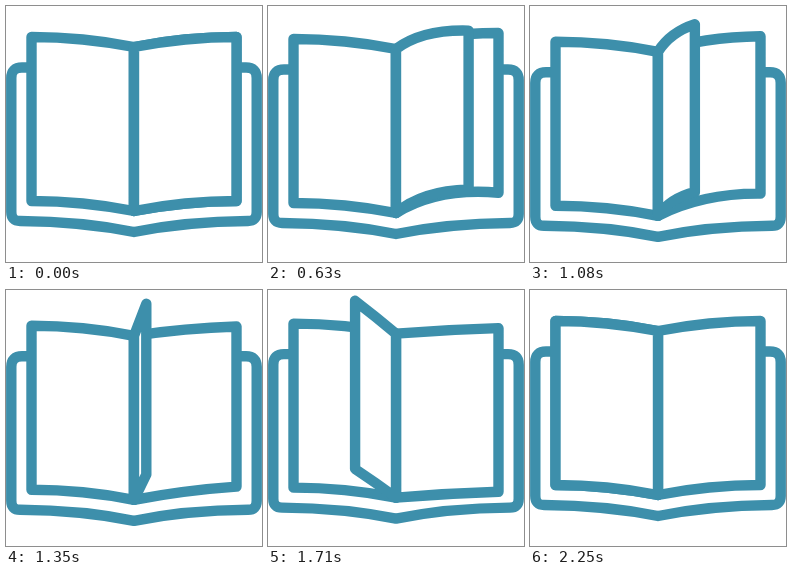
Animation, 256 px wide and 256 px high, one loop 2520 ms. Source, as an HTML page:

```html
<!DOCTYPE html>
<html lang="en">
<head>
<meta charset="utf-8">
<title>Book turning a page</title>
<style>
  html, body { margin: 0; width: 100%; height: 100%; overflow: hidden; background: #fff; }
  svg { display: block; width: 100vw; height: 100vh; }
  path { fill: #fff; stroke: #3d8fab; stroke-width: 10.4; stroke-linejoin: round; }
</style>
</head>
<body>
<svg viewBox="0 0 256 256">
  <path id="cover" d="M25 61.500H16Q5.300 61.500 5.300 72V206Q5.300 215 14 215Q76 215.500 128 226Q180 215.500 242 215Q250.700 215 250.700 206V72Q250.700 61.500 240 61.500H231"/>
  <path id="left"/>
  <path id="right"/>
  <path id="turning"/>
</svg>
<script>
const LOOP = 2520, STEP = 90, START = 180, END = 2250, BOB = 5;
const SPINE = { x: 128, top: 41, bottom: 205 };
const PAGE = { width: 102.5, top: 31, bottom: 195, bow: 5 };

// [time, reach]: the loose edge slows while the page stands upright
const TURN = [[START, 1], [810, 0.55], [1350, 0.12], [1890, -0.655], [END, -1]];

const byId = id => document.getElementById(id);

// Smooth curve through the points, at rest at both ends
function through(points, t) {
  const last = points.length - 1;
  const i = Math.max(0, points.findLastIndex((point, n) => n < last && point[0] <= t));
  const slope = n => n === 0 || n === last ? 0 :
    (points[n + 1][1] - points[n - 1][1]) / (points[n + 1][0] - points[n - 1][0]);
  const [t0, a] = points[i], [t1, b] = points[i + 1];
  const span = t1 - t0, u = (t - t0) / span, v = 1 - u;
  return a * v * v * (1 + 2 * u) + b * u * u * (1 + 2 * v) +
    span * u * v * (slope(i) * v - slope(i + 1) * u);
}

// reach: edge position from 1 (right) to -1 (left); rises lift the edge,
// bows arch the top and bottom lines, pull moves the arch to the spine
function drawPage(id, bob, { reach, riseTop = 0, riseBottom = 0,
                             bowTop = PAGE.bow, bowBottom = bowTop, pull = 0 }) {
  const x = SPINE.x + PAGE.width * reach;
  const top = PAGE.top - riseTop, bottom = PAGE.bottom - riseBottom;
  const bendX = (SPINE.x + x) / 2 - pull;
  const bendTop = (SPINE.top + top) / 2 - bowTop;
  const bendBottom = (SPINE.bottom + bottom) / 2 - bowBottom;
  const path = byId(id);
  path.setAttribute('transform', `translate(0 ${bob})`);
  path.setAttribute('d',
    `M${SPINE.x} ${SPINE.top}Q${bendX} ${bendTop} ${x} ${top}V${bottom}` +
    `Q${bendX} ${bendBottom} ${SPINE.x} ${SPINE.bottom}Z`);
}

function render(time) {
  const stepped = Math.floor((time % LOOP) / STEP) * STEP;
  const t = Math.min(END, Math.max(START, stepped));
  const phase = Math.PI * (t - START) / (END - START);
  const swell = Math.sin(phase) ** 2;
  const sway = Math.sin(2 * phase);
  const gust = sway * Math.sin(phase);
  const curl = Math.max(0, gust);
  const pull = 16 * curl;
  const bob = BOB * swell;
  const reach = through(TURN, t);
  const upright = 1 - reach * reach;

  byId('cover').setAttribute('transform', `translate(0 ${bob})`);
  drawPage('left', bob, { reach: -1 });
  drawPage('right', bob, {
    reach: 1, pull,
    riseTop: 8 * gust + 2.5 * swell,
    riseBottom: 11.5 * gust + 8 * swell,
    bowTop: PAGE.bow + 5 * gust,
    bowBottom: PAGE.bow + 5 * gust + 12 * curl
  });
  drawPage('turning', bob, {
    reach, pull,
    riseTop: upright * (23.5 - 9.4 * reach),
    riseBottom: 14.5 * upright + 6.5 * sway * sway,
    bowTop: PAGE.bow * reach * reach + 13 * curl
  });
}

const begin = performance.now();
function tick() {
  render(performance.now() - begin);
  requestAnimationFrame(tick);
}
tick();
</script>
</body>
</html>
```
